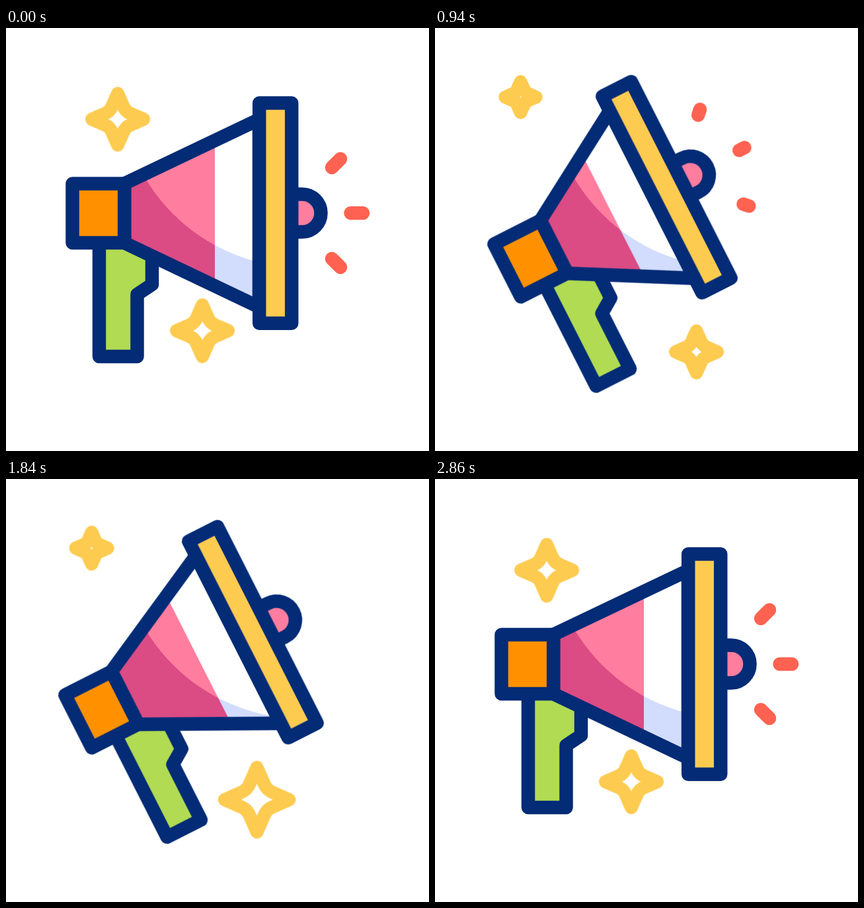
These frames come from a looping animation (640 by 640 pixels, 3020 ms). An HTML page without scripts:

```html
<!DOCTYPE html>
<html lang="en">
<head>
<meta charset="utf-8">
<title>Megaphone</title>
<style>
  html, body { margin: 0; width: 100%; height: 100%; overflow: hidden; background: #fff; }
  svg { display: block; width: 100%; height: 100%; }

  :root {
    --navy: #032b76;
    --cone-out: path("M179 235.5 L383 138.2 L383 422.3 L179 325 Z");
    --cone-in: path("M179 235.5 L347.5 135 L347.5 419 L179 325 Z");
    --band-out: path("M179 235.5 L316 170.2 L316 390.3 L179 325 Z");
    --band-in: path("M179 235.5 L280.5 175 L280.5 381.6 L179 325 Z");
  }

  .turn, .push, .cone, .band, .ray, .rays, .path1, .path2, .size1, .size2 {
    animation: 3.02s cubic-bezier(.333, 0, .667, 1) infinite;
  }
  .turn { transform-origin: 286px 304.5px; animation-name: turn; }
  .push { animation-name: push; }
  .cone { d: var(--cone-out); animation-name: cone; }
  .band { d: var(--band-out); animation-name: band; }
  .ray { animation-name: ray; }
  .rays { animation-name: blink; animation-timing-function: step-end; }
  .path1 { animation-name: path1; }
  .path2 { animation-name: path2; }
  .size1 { animation-name: size1; }
  .size2 { animation-name: size2; }

  .line { stroke: var(--navy); stroke-width: 20.5; stroke-linejoin: round; stroke-linecap: round; }
  .ray { stroke: #ff6251; stroke-width: 20.5; stroke-linecap: round; }
  .star {
    d: path("M0 -40L8.8 -20Q12 -12 20 -8.8L40 0L20 8.8Q12 12 8.8 20L0 40L-8.8 20Q-12 12 -20 8.8L-40 0L-20 -8.8Q-12 -12 -8.8 -20Z");
    fill: none; stroke: #fdcb50; stroke-width: 20; stroke-linejoin: round;
    vector-effect: non-scaling-stroke;
  }

  @keyframes turn {
    0%, 83.1%, 100% { transform: rotate(0deg); }
    17.2%, 60.6% { transform: rotate(-26.9deg); }
  }

  /* the horn slides back twice */
  @keyframes push {
    0%, 20.9%, 42.55%, 65.1%, 100% { transform: translate(0px, 0px); }
    31.5%, 53.8% { transform: translate(-35.5px, -3.2px); }
  }
  @keyframes cone {
    0%, 20.9%, 42.55%, 65.1%, 100% { d: var(--cone-out); }
    31.5%, 53.8% { d: var(--cone-in); }
  }
  @keyframes band {
    0%, 20.9%, 42.55%, 65.1%, 100% { d: var(--band-out); }
    31.5%, 53.8% { d: var(--band-in); }
  }

  /* rays grow from the inner end, then shrink to the outer end */
  @keyframes ray {
    0%, 25.83%, 48.34%, 88.7%, 100% { stroke-dasharray: 1 3; stroke-dashoffset: 0; }
    15.56%, 36.42%, 58.94% { stroke-dasharray: .01 3; stroke-dashoffset: -.99; }
    15.57%, 21.52%, 36.43%, 44.04%, 58.95%, 80.1% { stroke-dasharray: .01 3; stroke-dashoffset: 0; }
  }
  @keyframes blink {
    0%, 21.52%, 44.04%, 80.1%, 100% { opacity: 1; }
    15.56%, 36.42%, 58.94% { opacity: 0; }
  }

  @keyframes path1 {
    0%, 7.28%, 93.38%, 100% { transform: translate(169px, 138px); }
    30.8%, 60.26% { transform: translate(129.5px, 104.5px); }
  }
  @keyframes path2 {
    0% { transform: translate(297px, 458px); animation-timing-function: cubic-bezier(.3, .15, .7, .67); }
    11.26% { transform: translate(338px, 471.3px); animation-timing-function: linear; }
    21.85% { transform: translate(380.5px, 485.2px); animation-timing-function: cubic-bezier(.25, .55, .6, 1); }
    29.8% { transform: translate(395.5px, 490px); }
    41% { transform: translate(395.5px, 490px); animation-timing-function: cubic-bezier(.4, 0, .7, .5); }
    51.66% { transform: translate(392px, 489px); animation-timing-function: cubic-bezier(.4, .2, .7, .6); }
    68.87% { transform: translate(363px, 480px); animation-timing-function: cubic-bezier(.35, .3, .65, 1); }
    89.4%, 100% { transform: translate(297px, 458px); }
  }
  @keyframes size1 {
    0%, 6.29%, 93.38%, 100% { transform: scale(.975); }
    19.54% { transform: scale(1.23); }
    46.03%, 72.52% { transform: scale(1.29); }
    32.78%, 58.77% { transform: scale(.55); }
  }
  @keyframes size2 {
    0%, 89.4%, 100% { transform: scale(.975); }
    13.25%, 39.74%, 64.2% { transform: scale(1.39); }
    26.49%, 52.98% { transform: scale(.55); }
  }
</style>
</head>
<body>
<svg viewBox="0 0 640 640">
  <defs>
    <clipPath id="lit"><circle cx="447.5" cy="86.5" r="275.5"/></clipPath>
  </defs>

  <!-- handle and shaded cone -->
  <g class="turn">
    <path class="line" fill="#b1db52" d="M141 325V497H198.5V403L221 388V345"/>
    <path class="cone" fill="#d2dcfd"/>
    <path class="band" fill="#db4b84"/>
  </g>

  <!-- lit side: the light stays still while the cone turns -->
  <g clip-path="url(#lit)">
    <g class="turn">
      <path class="cone" fill="#fff"/>
      <path class="band" fill="#ff7d9f"/>
    </g>
  </g>

  <g class="turn">
    <path class="cone line" fill="none"/>
    <rect class="line" fill="#ff9100" x="100.5" y="235.5" width="78.7" height="89.5"/>
    <g class="push">
      <g class="rays">
        <path class="ray" pathLength="1" d="M493 211L506 198"/>
        <path class="ray" pathLength="1" d="M521.5 280H540"/>
        <path class="ray" pathLength="1" d="M493 349L506 362"/>
      </g>
      <path class="line" fill="#ff7d9f" d="M432 251.5H448A28.5 28.5 0 0 1 448 308.5H432"/>
      <rect class="line" fill="#fdcb50" x="383.2" y="113.5" width="49" height="333.3"/>
    </g>
  </g>

  <g class="path1"><g class="size1"><path class="star"/></g></g>
  <g class="path2"><g class="size2"><path class="star"/></g></g>
</svg>
</body>
</html>
```
